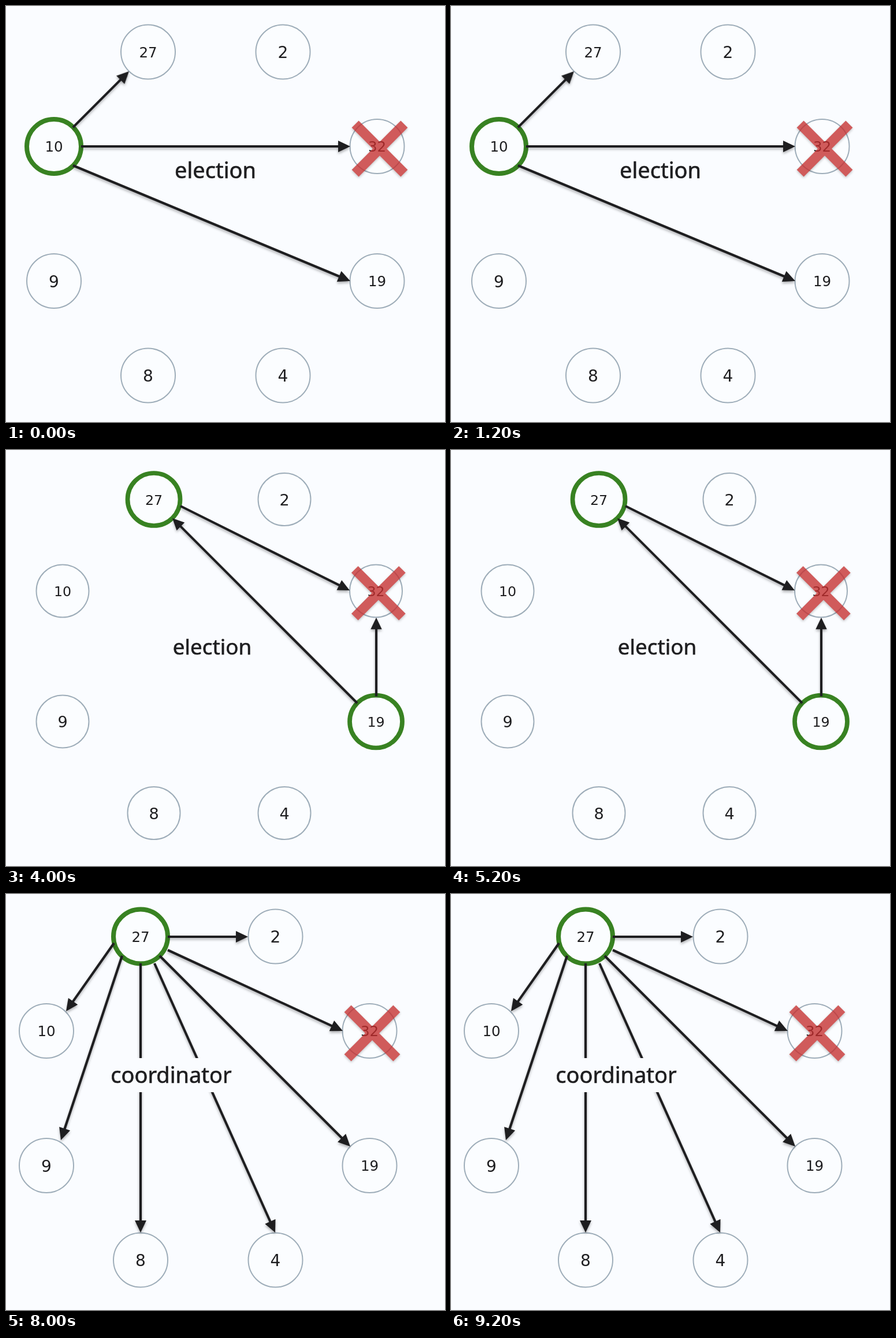
Write an HTML page that moves like this. It is 760 px wide and 720 px high and loops after 10 s.

```html
<!DOCTYPE html>
<html lang="en">
<head>
<meta charset="utf-8">
<title>Leader election</title>
<style>
  html, body { margin: 0; width: 100%; height: 100%; overflow: hidden; background: #fafcff; }
  svg { display: block; width: 760px; height: 720px; }
  .scene { visibility: hidden; animation: show 10s step-end infinite; }
  @keyframes show {
    0% { visibility: visible; }
    20%, 100% { visibility: hidden; }
  }
  text { fill: #1e1e20; text-anchor: middle; font-family: "DejaVu Sans", sans-serif; }
  .label { font-family: "Noto Sans", sans-serif; stroke: #1e1e20; stroke-width: .6; }
  .node { fill: #fbfdff; stroke: #9eadb9; stroke-width: 2; }
  .active { stroke: #388222; }
  .arrows { fill: #1e1e20; stroke: none; filter: drop-shadow(0 3px 2px rgba(0, 0, 0, .3)); }
  .arrows line { stroke: #1e1e20; }
  .plate { fill: #fafcff; }
  .cross { fill: #c52e2e; opacity: .78; filter: drop-shadow(0 2px 2px rgba(0, 0, 0, .3)); }
</style>
</head>
<body>
<svg id="stage" viewBox="0 0 760 720"></svg>
<script>
const STEP = 2;
const RADIUS = 47;

// Column and row of each node on the ring
const nodes = [
  [27, 1, 0], [2, 2, 0], [32, 3, 1], [19, 3, 2],
  [4, 2, 3], [8, 1, 3], [9, 0, 2], [10, 0, 1]
];

// label: text, centre x, baseline; arrows: tail x, y, tip x, y
const scenes = [
  { r: 47, xs: [83, 246, 479.5, 642.5], ys: [79.5, 243, 476, 639.5],
    active: [10], label: ["election", 362.5, 298],
    arrows: [[116, 210, 213, 113], [130, 243, 596, 243], [116, 276, 596, 476]] },
  { r: 46, xs: [98.5, 258, 486, 645], ys: [90, 250, 478, 637.5],
    active: [10], label: ["answer", 371.5, 304],
    arrows: [[226, 123, 132, 217], [600, 478, 132, 283]] },
  { r: 45.5, xs: [98, 256, 482, 640.5], ys: [85.5, 244, 470, 628.5],
    active: [27, 19], label: ["election", 357, 354],
    arrows: [[302, 97, 595, 243], [608, 438, 288, 118], [641, 426, 641, 290]] },
  { r: 46, xs: [91, 250.5, 479.5, 639], ys: [76.5, 237, 465, 625.5],
    active: [27], label: ["answer", 354, 348],
    arrows: [[284, 110, 606, 433]] },
  { r: 47, xs: [70, 233, 466.5, 629.5], ys: [73.5, 237, 470, 633.5],
    active: [27], label: ["coordinator", 286, 327], plate: true,
    arrows: [[280, 74, 419, 74], [280, 97, 583, 237], [266, 107, 596, 437],
      [257, 120, 466, 586], [233, 120, 233, 586], [201, 107, 95, 426], [187, 85, 104, 203]] }
];

function drawNode(id, x, y, scene, scale) {
  const on = scene.active.includes(id);
  const size = id > 9 ? 24.5 : 28;
  return `<circle class="node${on ? " active" : ""}" cx="${x}" cy="${y}" r="${scene.r}"
      ${on ? `style="stroke-width:${8 * scale}"` : ""}/>
    <text x="${x}" y="${y + size * scale * .38}" font-size="${size * scale}">${id}</text>`;
}

function drawArrow([x1, y1, x2, y2], scale) {
  const angle = Math.atan2(y2 - y1, x2 - x1) * 180 / Math.PI;
  const length = Math.hypot(x2 - x1, y2 - y1);
  const head = 21 * scale, half = 10 * scale;
  return `<g transform="translate(${x1} ${y1}) rotate(${angle})">
    <line x2="${length - head + 1}" stroke-width="${4.2 * scale}"/>
    <path d="M${length} 0l${-head} ${-half}v${2 * half}z"/></g>`;
}

function drawCross(x, y, scale) {
  return `<g class="cross"><path transform="translate(${x + 4.5 * scale} ${y + 4 * scale}) rotate(45) scale(${scale})"
    d="M-8.5-60h17v51.5h51.5v17h-51.5v51.5h-17v-51.5h-51.5v-17h51.5z"/></g>`;
}

function drawScene(scene, i) {
  const scale = scene.r / RADIUS;
  const [word, x, y] = scene.label;
  const ring = nodes.map(([id, c, r]) => drawNode(id, scene.xs[c], scene.ys[r], scene, scale)).join("");
  const arrows = scene.arrows.map(a => drawArrow(a, scale)).join("");
  const plate = scene.plate ? `<rect class="plate" x="176" y="284" width="220" height="59"/>` : "";
  return `<g class="scene" style="animation-delay:${i * STEP}s">
    ${ring}<g class="arrows">${arrows}</g>${plate}
    <text class="label" x="${x}" y="${y}" font-size="${38 * scale}">${word}</text>
    ${drawCross(scene.xs[3], scene.ys[1], scale)}</g>`;
}

document.getElementById("stage").innerHTML = scenes.map(drawScene).join("");
</script>
</body>
</html>
```
